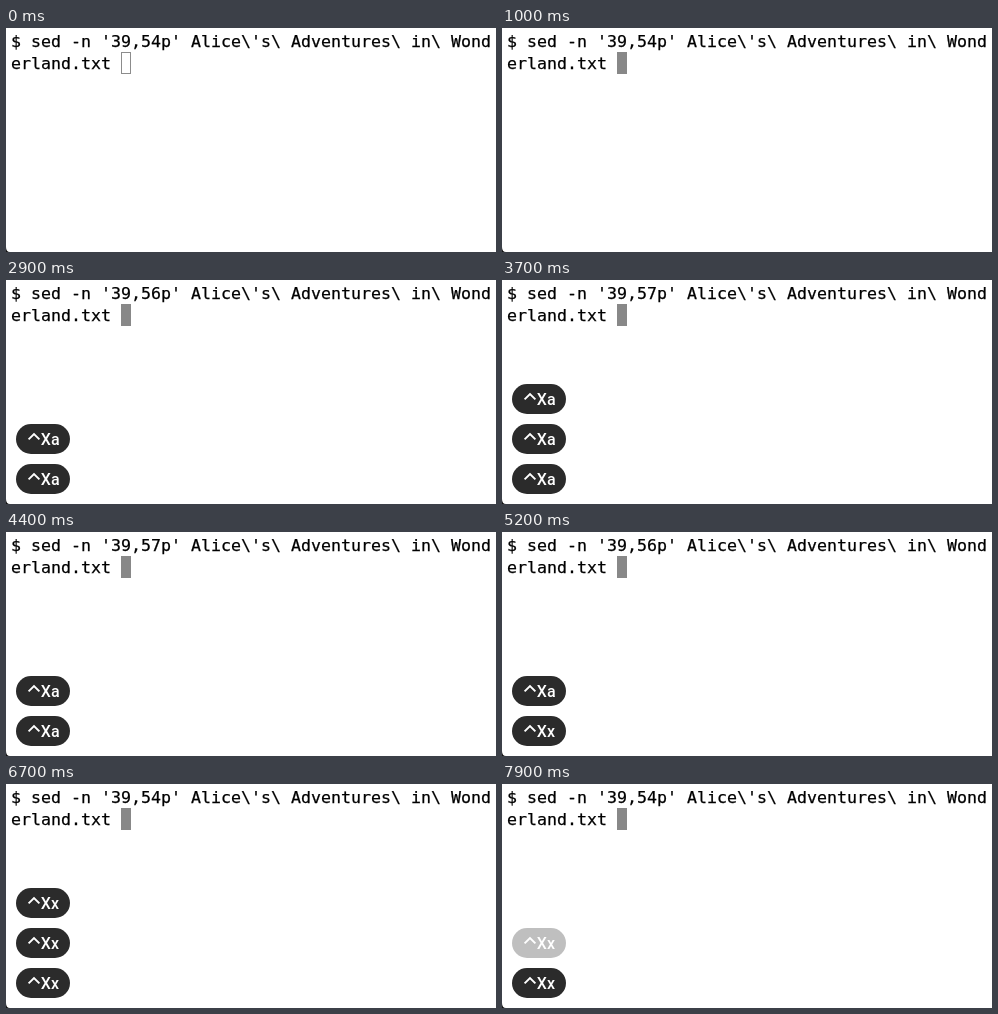
Recreate the animation shown at these times as an HTML page. Size 490x224 px, loop 8000 ms.

```html
<!DOCTYPE html>
<html lang="en">
<head>
<meta charset="utf-8">
<title>Terminal key presses</title>
<style>
html, body { margin: 0; width: 100%; height: 100%; overflow: hidden; background: #fff; }
svg { display: block; width: 490px; height: 224px; }
.line { font: 16.61px "DejaVu Sans Mono", monospace; fill: #000; stroke: #000; stroke-width: .25px; white-space: pre; }
.label { font: 500 16px Roboto, sans-serif; fill: #fff; }
.caret { fill: none; stroke: #fff; stroke-width: 1.9; }
.block { fill: #888; }
.hollow { fill: #fff; stroke: #8c8c8c; }
.anim { animation: 8s step-end infinite; }

/* terminal: cleared from 2100 to 2300 ms */
.screen { animation-name: screen; }
.home { animation-name: home; }
.hollow { animation-name: unfocused; }
@keyframes screen { 0%, 28.75% { opacity: 1 } 26.25% { opacity: 0 } }
@keyframes home { 0%, 28.75% { opacity: 0 } 26.25% { opacity: 1 } }
@keyframes unfocused { 0% { opacity: 1 } 6.25%, 100% { opacity: 0 } }

/* last digit counts up, then down */
.d4 { animation-name: d4; }
.d5 { animation-name: d5; }
.d6 { animation-name: d6; }
.d7 { animation-name: d7; }
@keyframes d4 { 0%, 81.25%, 100% { opacity: 1 } 26.25% { opacity: 0 } }
@keyframes d5 { 0%, 36.25%, 81.25%, 100% { opacity: 0 } 28.75%, 71.25% { opacity: 1 } }
@keyframes d6 { 0%, 45%, 71.25%, 100% { opacity: 0 } 36.25%, 63.75% { opacity: 1 } }
@keyframes d7 { 0%, 63.75%, 100% { opacity: 0 } 45% { opacity: 1 } }

/* key labels: appear, move up a slot per new key, fade */
.key { opacity: 0; }
.up1 { animation-name: up1, up1-fade; }
.up2 { animation-name: up2, up2-fade; }
.up3 { animation-name: up3, up3-fade; }
.down1 { animation-name: down1, down1-fade; }
.down2 { animation-name: down2, down2-fade; }
.down3 { animation-name: down3-fade; }
@keyframes up1 { 0% { transform: none } 33.75% { transform: translateY(-40px) } 42.5%, 100% { transform: translateY(-80px) } }
@keyframes up2 { 0% { transform: none } 42.5%, 100% { transform: translateY(-40px) } }
@keyframes up3 { 0% { transform: none } 61.25% { transform: translateY(-40px) } 68.75%, 100% { transform: translateY(-80px) } }
@keyframes down1 { 0% { transform: none } 68.75% { transform: translateY(-40px) } 78.75%, 100% { transform: translateY(-80px) } }
@keyframes down2 { 0% { transform: none } 78.75%, 100% { transform: translateY(-40px) } }
@keyframes up1-fade { 0% { opacity: 0 } 23.75% { opacity: 1 } 52.5% { opacity: .65 } 53.75% { opacity: .3 } 55%, 100% { opacity: 0 } }
@keyframes up2-fade { 0% { opacity: 0 } 33.75% { opacity: 1 } 56.25% { opacity: .65 } 57.5% { opacity: .3 } 58.75%, 100% { opacity: 0 } }
@keyframes up3-fade { 0% { opacity: 0 } 42.5% { opacity: 1 } 68.75% { opacity: .65 } 70% { opacity: .3 } 71.25%, 100% { opacity: 0 } }
@keyframes down1-fade { 0% { opacity: 0 } 61.25% { opacity: 1 } 87.5% { opacity: .65 } 88.75% { opacity: .3 } 90%, 100% { opacity: 0 } }
@keyframes down2-fade { 0% { opacity: 0 } 68.75% { opacity: 1 } 97.5% { opacity: .65 } 98.75%, 100% { opacity: .3 } }
@keyframes down3-fade { 0% { opacity: 0 } 78.75%, 100% { opacity: 1 } }
</style>
</head>
<body>
<svg viewBox="0 0 490 224" xmlns="http://www.w3.org/2000/svg">
  <defs>
    <g id="pill">
      <rect x="10" y="184" width="54" height="30" rx="15" fill="#2b2b2b"/>
      <path class="caret" d="M22.6 199.4l5.4-5.4 5.4 5.4"/>
    </g>
    <g id="add"><use href="#pill"/><text class="label" x="34.8" y="205">Xa</text></g>
    <g id="sub"><use href="#pill"/><text class="label" x="34.8" y="205">Xx</text></g>
  </defs>

  <path d="M0 219Q0 224 4 224H0Z" fill="#111"/>

  <g class="anim screen">
    <g class="line">
      <text x="5" y="19">$ sed -n '39,5</text>
      <text class="anim d4" x="145" y="19">4</text>
      <text class="anim d5" x="145" y="19">5</text>
      <text class="anim d6" x="145" y="19">6</text>
      <text class="anim d7" x="145" y="19">7</text>
      <text x="155" y="19">p' Alice\'s\ Adventures\ in\ Wond</text>
      <text x="5" y="41">erland.txt</text>
    </g>
    <rect class="block" x="115" y="24" width="10" height="22"/>
    <rect class="anim hollow" x="115.5" y="24.5" width="9" height="21"/>
  </g>
  <rect class="anim home block" x="5" y="2" width="10" height="22"/>

  <g class="anim key up1"><use href="#add"/></g>
  <g class="anim key up2"><use href="#add"/></g>
  <g class="anim key up3"><use href="#add"/></g>
  <g class="anim key down1"><use href="#sub"/></g>
  <g class="anim key down2"><use href="#sub"/></g>
  <g class="anim key down3"><use href="#sub"/></g>
</svg>
</body>
</html>
```
